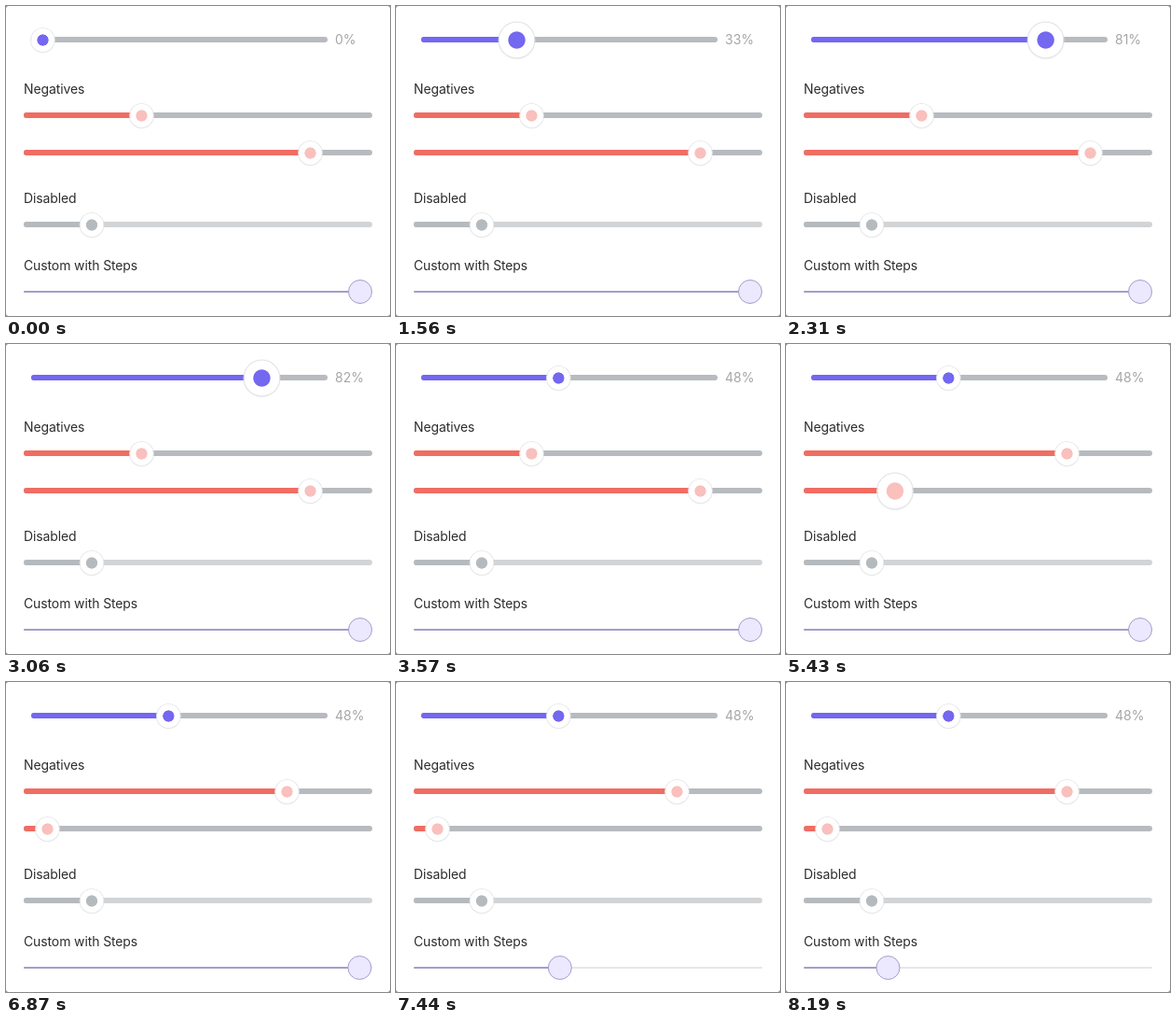
These frames come from a looping animation (412 by 332 pixels, 9120 ms). An HTML page:

```html
<!DOCTYPE html>
<html lang="en">
<head>
<meta charset="utf-8">
<title>Sliders</title>
<style>
@property --p { syntax: "<number>"; inherits: true; initial-value: 0; }
@property --x { syntax: "<length>"; inherits: true; initial-value: 0px; }
@property --s { syntax: "<number>"; inherits: true; initial-value: 1; }

html, body { margin: 0; width: 100%; height: 100%; overflow: hidden; background: #8a8a8a; }
.stage {
  position: relative; width: 412px; height: 332px; overflow: hidden;
  background: #fff; border-radius: 3px;
  font: 14px/20px Inter, Roboto, sans-serif; letter-spacing: -.12px; color: #2d2d2f;
}
.text { position: absolute; left: 19px; white-space: nowrap; }
#value { left: 353px; top: 26px; color: #a6a6a8; letter-spacing: 0; }

/* --x is the thumb centre on the stage, --l the left end of the track */
.slider {
  --l: 19px; --w: 374px; --h: 6px; --track: #b7bbbf;
  position: absolute; left: 0; top: var(--y); width: 412px; height: 0;
  animation: 9120ms linear infinite;
}
.slider::before, .slider::after {
  content: ""; position: absolute; left: var(--l); top: calc(var(--h) / -2);
  height: var(--h); border-radius: 3px;
}
.slider::before { width: var(--w); background: var(--track); }
.slider::after { width: calc(var(--x) - var(--l)); background: var(--fill); }
.thumb {
  position: absolute; z-index: 1; left: -12.5px; top: -12.5px; width: 25px; height: 25px;
  border-radius: 50%; background: radial-gradient(circle, var(--dot) 5.8px, #fff 6.4px);
  box-shadow: 0 0 0 .8px #e3e4e6, 0 .5px 2px rgba(0, 0, 0, .12);
  transform: translateX(var(--x)) scale(var(--s));
}

.main {
  --y: 36px; --l: 27px; --w: 318px; --fill: #7467f0; --dot: #7467f0;
  --x: max(39px, 27px + var(--p) * 3.06px);
  animation-name: main, main-press;
}
.red { --fill: #f06d63; --dot: #f9c0bd; }
.red-a { --y: 117px; --x: 145px; animation-name: red-a, red-a-press; }
.red-b { --y: 157px; --x: 326px; animation-name: red-b, red-b-press; }
.off { --y: 234px; --x: 91.5px; --track: #d2d4d6; --fill: #b5babe; --dot: #b5babe; }
.steps {
  --y: 306px; --h: 2px; --x: 380px; --track: #e7e7ea; --fill: #a79bc9;
  animation-name: steps;
}
.steps .thumb {
  box-sizing: border-box; left: -13.25px; top: -13.25px; width: 26.5px; height: 26.5px;
  background: #ece8fe; border: 1.3px solid #a79bcb; box-shadow: none;
}

@keyframes main {
  0%, 11.513% { --p: 0; animation-timing-function: cubic-bezier(.3, .1, .7, .8); }
  17.105% { --p: 33.3; }
  21.546% { --p: 55; }
  25.329% { --p: 82; animation-timing-function: cubic-bezier(.2, .6, .5, 1); }
  28.509%, 31.908% { --p: 88; animation-timing-function: ease-in-out; }
  37.5%, 100% { --p: 48; }
}
@keyframes main-press {
  0%, 11.513% { --s: 1; }
  12.829%, 37.5% { --s: 1.5; }
  39.145%, 100% { --s: 1; }
}
@keyframes red-a {
  0%, 43.75% { --x: 145px; animation-timing-function: cubic-bezier(.35, .2, .35, 1); }
  50%, 100% { --x: 301px; }
}
@keyframes red-a-press {
  0%, 43.75% { --s: 1; }
  45.066%, 50.439% { --s: 1.5; }
  52.303%, 100% { --s: 1; }
}
@keyframes red-b {
  0%, 55.592% { --x: 326px; animation-timing-function: cubic-bezier(.35, .2, .7, .8); }
  59.539% { --x: 117px; animation-timing-function: cubic-bezier(.2, .5, .4, 1); }
  63.487%, 100% { --x: 44px; }
}
@keyframes red-b-press {
  0%, 55.592% { --s: 1; }
  56.908%, 63.487% { --s: 1.5; }
  65.461%, 100% { --s: 1; }
}
@keyframes steps {
  0%, 75% { --x: 380px; animation-timing-function: ease-in-out; }
  85.03%, 100% { --x: 109.5px; }
}
</style>
</head>
<body>
<div class="stage">
  <div class="slider main"><div class="thumb"></div></div>
  <div class="text" id="value">0%</div>
  <div class="text" style="top: 79px">Negatives</div>
  <div class="slider red red-a"><div class="thumb"></div></div>
  <div class="slider red red-b"><div class="thumb"></div></div>
  <div class="text" style="top: 196px">Disabled</div>
  <div class="slider off"><div class="thumb"></div></div>
  <div class="text" style="top: 268px">Custom with Steps</div>
  <div class="slider steps"><div class="thumb"></div></div>
</div>
<script>
const style = getComputedStyle(document.querySelector('.main'));
const value = document.getElementById('value');

function tick() {
  value.textContent = Math.round(style.getPropertyValue('--p')) + '%';
  requestAnimationFrame(tick);
}
tick();
</script>
</body>
</html>
```
